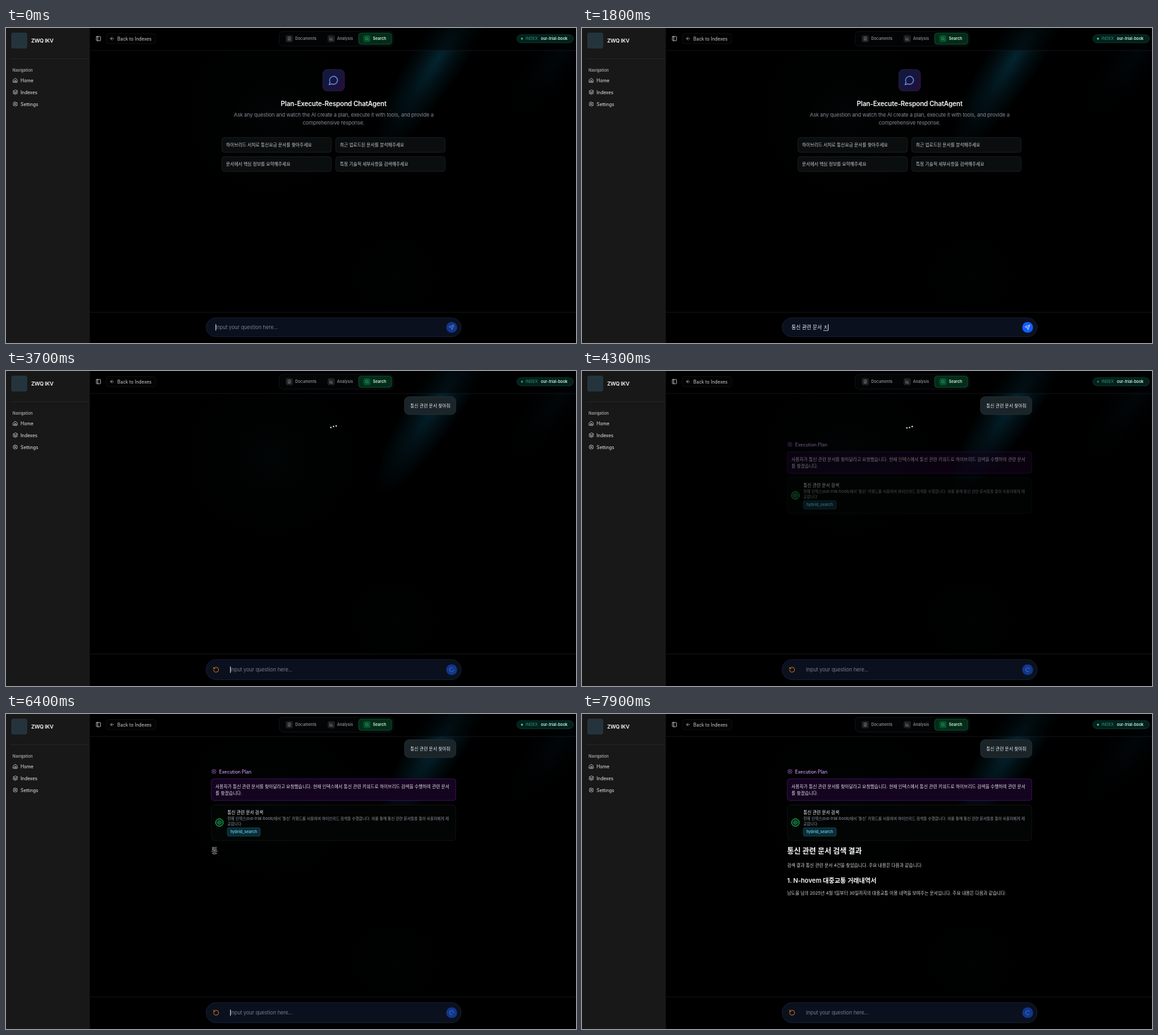
An HTML page for the animation above (8 s loop, 860x476 px).

```html
<!DOCTYPE html>
<html lang="ko">
<head>
<meta charset="utf-8">
<title>Document chat</title>
<style>
  html, body { margin: 0; width: 100%; height: 100%; overflow: hidden; background: #000; }
  svg { display: block; width: 860px; height: 476px; }
  text { font-family: Inter, "Noto Sans CJK KR", "Noto Sans CJK", sans-serif; white-space: pre; }
</style>
</head>
<body>
<svg id="stage" viewBox="0 0 860 476" xmlns="http://www.w3.org/2000/svg"></svg>
<script>
const LOOP = 8000, SEND = 2350, PLAN = 4200, ANSWER = 6200, STREAM = 6394;
const KEY_START = 100, KEY_STEP = 76;
const CHAR_STEP = 10.2, CHAR_FADE = 14;

const stage = document.getElementById('stage');
const $ = id => document.getElementById(id);
const clamp = v => Math.max(0, Math.min(1, v));

// Markup helpers
const text = (x, y, str, size, fill, weight = 400, extra = '') =>
  `<text x="${x}" y="${y}" font-size="${size}" fill="${fill}" font-weight="${weight}" ${extra}>${str}</text>`;
const box = (x, y, w, h, r, fill, stroke = 'none', extra = '') =>
  `<rect x="${x}" y="${y}" width="${w}" height="${h}" rx="${r}" fill="${fill}" stroke="${stroke}" stroke-width=".6" ${extra}/>`;
const line = (x1, y1, x2, y2, stroke) =>
  `<path d="M${x1} ${y1}L${x2} ${y2}" stroke="${stroke}" stroke-width=".6"/>`;
const icon = (cx, cy, size, d, stroke, id = '') =>
  `<g transform="translate(${cx - size / 2} ${cy - size / 2}) scale(${size / 24})"><path ${id && `id="${id}"`} d="${d}" fill="none" stroke="${stroke}" stroke-width="2" stroke-linecap="round" stroke-linejoin="round"/></g>`;
const circlePath = r => `M${12 - r} 12a${r} ${r} 0 1 0 ${2 * r} 0a${r} ${r} 0 1 0 ${-2 * r} 0`;

const ICONS = {
  home: 'M15 21v-8H9v8M3 10l9-7 9 7v11H3z',
  layers: 'M12 2 2 7l10 5 10-5zM2 12l10 5 10-5M2 17l10 5 10-5',
  gear: 'M12 2l3 3 4.500 0 .5 4.500 2 2.500-2 2.500-.5 4.500-4.500 0-3 3-3-3-4.500 0-.5-4.500-2-2.500 2-2.500 .5-4.500 4.500 0z' + circlePath(3),
  panel: 'M5 3h14a2 2 0 0 1 2 2v14a2 2 0 0 1-2 2H5a2 2 0 0 1-2-2V5a2 2 0 0 1 2-2zM9 3v18',
  back: 'M12 19l-7-7 7-7M19 12H5',
  file: 'M14 2H5v20h14V7zM14 2v5h5M9 13h6M9 17h6',
  chart: 'M3 3v18h18M8 17v-4M13 17V6M18 17v-7',
  search: 'M3 11a8 8 0 1 0 16 0a8 8 0 1 0-16 0M21 21l-4.300-4.300',
  chat: 'M7.9 20A9 9 0 1 0 4 16.100L2 22Z',
  send: 'M22 2 11 13M22 2l-7 20-4-9-9-4z',
  reset: 'M3 12a9 9 0 1 0 9-9 9.750 9.750 0 0 0-6.740 2.740L3 8M3 3v5h5',
  check: circlePath(10) + 'M8 12l3 3 5-6',
  spinner: 'M21 12a9 9 0 1 1-6.219-8.560'
};

const glow = (id, color, peak) =>
  `<radialGradient id="${id}"><stop stop-color="${color}" stop-opacity="${peak}"/><stop offset=".5" stop-color="${color}" stop-opacity="${peak * .4}"/><stop offset="1" stop-color="${color}" stop-opacity="0"/></radialGradient>`;

const backdrop = `
  <defs>
    ${glow('beam', '#063a4c', .62)}${glow('haze', '#041614', .22)}
    <linearGradient id="badge" x2="1" y2="1"><stop stop-color="#101a3c"/><stop offset="1" stop-color="#260d3a"/></linearGradient>
    <clipPath id="main"><rect x="126.500" width="734" height="476"/></clipPath>
  </defs>
  <rect width="860" height="476"/>
  <g clip-path="url(#main)">
    <ellipse cx="400" cy="130" rx="130" ry="120" fill="url(#haze)"/>
    <ellipse cx="585" cy="375" rx="70" ry="60" fill="url(#haze)" opacity=".6"/>
    <ellipse rx="165" ry="40" fill="url(#beam)" transform="translate(652 46) rotate(-57)"/>
    <ellipse rx="110" ry="36" fill="url(#beam)" opacity=".18" transform="translate(835 42) rotate(-50)"/>
    <rect x="126.500" width="734" height="34" fill="#000" opacity=".5"/>
  </g>`;

const navItem = (y, name, label) => icon(14, y, 8, ICONS[name], '#e5e5e5') + text(22, y + 2.5, label, 6.92, '#ececec');
const sidebar = `
  <rect width="126.500" height="476" fill="#181818"/>
  <rect x="8" y="7" width="24" height="24" rx="3" fill="#24343d"/>
  ${text(38, 21.6, 'ZWQ IKV', 7.9, '#fafafa', 600, 'letter-spacing="-.15"')}
  ${line(6, 46.5, 125, 46.5, '#2d2d2d')}
  ${text(10, 65.5, 'Navigation', 5.95, '#b5b5b5', 500)}
  ${navItem(79, 'home', 'Home')}${navItem(97, 'layers', 'Indexes')}${navItem(115, 'gear', 'Settings')}`;

const tab = (x, name, label, bg, fg, ink, weight) =>
  box(x, 10.7, 10.8, 10.8, 2.5, bg) + icon(x + 5.4, 16.1, 6, ICONS[name], fg) + text(x + 14.2, 18.2, label, 5.95, ink, weight);
const header = `
  ${line(126.5, 34, 860, 34, '#1b2125')}
  ${icon(139.5, 16, 8.5, ICONS.panel, '#e5e5e5')}
  ${box(151, 8.5, 75, 15.3, 4, '#030303', '#1a1a1a')}
  ${icon(160, 16, 8, ICONS.back, '#d4d4d4')}
  ${text(168, 18.5, 'Back to Indexes', 6.92, '#d0d0d0')}
  ${box(412, 5, 172.5, 22.3, 6, '#030405', '#1b1e20')}
  ${tab(422, 'file', 'Documents', '#1d1f20', '#999', '#96999d', 500)}
  ${tab(485.3, 'chart', 'Analysis', '#1d1f20', '#999', '#96999d', 500)}
  ${box(532, 7.7, 50, 17, 4, '#042c18', '#12693f')}
  ${tab(539.2, 'search', 'Search', '#07502b', '#34d399', '#d8f6e6', 600)}
  ${box(770.8, 10, 85.2, 12.3, 6.1, '#04201b', '#0c4c3d')}
  <circle id="live" cx="778.500" cy="16.100" r="1.600" fill="#34d399"/>
  ${text(784, 18.3, 'INDEX', 5.95, '#2c9f80', 400, 'letter-spacing=".1"')}
  ${text(807, 18.3, 'our-trial-book', 5.95, '#c9f7e5', 600)}`;

const suggestion = (x, y, label) =>
  box(x, y, 165.3, 22.6, 4, '#0a0e0f', '#23292b') + text(x + 6.3, y + 13.7, label, 6.63, '#cbced2');
const tracked = 'text-anchor="middle" letter-spacing="-.14"';
const hero = `<g id="hero">
  ${box(478, 62.8, 32.5, 32.3, 6.5, 'url(#badge)', '#2b3164')}
  ${icon(494.2, 79, 16, ICONS.chat, '#4b9af5')}
  ${text(494.3, 117.6, 'Plan-Execute-Respond ChatAgent', 9.88, '#fafafa', 600, tracked)}
  ${text(494.3, 133.8, 'Ask any question and watch the AI create a plan, execute it with tools, and provide a', 7.9, '#858a93', 400, tracked)}
  ${text(494.3, 145.8, 'comprehensive response.', 7.9, '#858a93', 400, tracked)}
  ${suggestion(325.7, 165.4, '하이브리드 서치로 통신요금 문서를 찾아주세요')}
  ${suggestion(497.4, 165.4, '최근 업로드된 문서를 분석해주세요')}
  ${suggestion(325.7, 194.3, '문서에서 핵심 정보를 요약해주세요')}
  ${suggestion(497.4, 194.3, '특정 기술적 세부사항을 검색해주세요')}
</g>`;

const plan = `<g id="plan">
  ${icon(313.7, 111, 8, ICONS.gear, '#b26bf0')}
  ${text(321.5, 113.5, 'Execution Plan', 6.92, '#cf9bf8', 500)}
  ${box(309.8, 122, 368.8, 32.7, 4, '#14041f', '#561a7c')}
  ${text(316, 135.9, '사용자가 통신 관련 문서를 찾아달라고 요청했습니다. 현재 인덱스에서 통신 관련 키워드로 하이브리드 검색을 수행하여 관련 문서', 6.63, '#e5deea')}
  ${text(316, 145.8, '를 찾겠습니다.', 6.63, '#e5deea')}
  ${box(309.8, 161.3, 368.8, 53.8, 5, '#030505', '#1a1d1e')}
  <circle cx="322" cy="188" r="5.800" fill="#06301a" stroke="#22c55e" stroke-width=".9"/>
  ${icon(322, 188, 6, ICONS.check, '#3ddc78')}
  ${text(334, 175, '통신 관련 문서 검색', 6.63, '#f5f5f5', 500)}
  ${text(334, 183.9, "현재 인덱스(our-trial-book)에서 '통신' 키워드를 사용하여 하이브리드 검색을 수행합니다. 이를 통해 통신 관련 문서들을 찾아 사용자에게 제", 5.72, '#979ca3')}
  ${text(334, 191.9, '공합니다.', 5.72, '#979ca3')}
  ${box(334, 196, 49.5, 12.6, 2, '#0a2c37', '#17596a')}
  ${text(338.6, 204.4, 'hybrid_search', 5.95, '#6bd8ea', 500)}
</g>`;

const ANSWER_LINES = [
  [211.4, 11.1, 700, '#fafafa', '통신 관련 문서 검색 결과'],
  [231.3, 6.63, 400, '#d6d8db', '검색 결과 통신 관련 문서 4건을 찾았습니다. 주요 내용은 다음과 같습니다:'],
  [255.4, 9.45, 600, '#fafafa', '1. N-hovem 대중교통 거래내역서'],
  [273.1, 6.63, 400, '#d6d8db', '남도율 님의 2025년 4월 1일부터 30일까지의 대중교통 이용 내역을 보여주는 문서입니다. 주요 내용은 다음과 같습니다:']
];
const answer = ANSWER_LINES.map(([y, size, weight, fill, str]) =>
  text(309.5, y, [...str].map(c => `<tspan class="ch">${c}</tspan>`).join(''), size, fill, weight)).join('');

const chat = `<g id="chat">
  ${box(601.2, 38.8, 77.5, 27, 7, '#1a2429', '#303b40')}
  ${text(610, 54.6, '통신 관련 문서 찾아줘', 6.63, '#e8eaec')}
  <g id="dots" fill="#f5f5f5">${[490.2, 494.2, 498.2].map(x => `<circle cx="${x}" cy="86" r="1.100"/>`).join('')}</g>
  ${plan}
  <g id="answer">${answer}</g>
</g>`;

const composer = `
  <g id="rule">${line(126.5, 0, 860, 0, '#1c1f22')}</g>
  <rect id="pill" x="301.800" width="385" rx="15" fill="#0a101e" stroke="#1d283c" stroke-width=".7"/>
  <g id="row">
    <g id="reset">${icon(317, 0, 10, ICONS.reset, '#f08316')}</g>
    ${text(316, 2.8, 'Input your question here...', 7.9, '#747b87', 400, 'id="hint" letter-spacing="-.14"')}
    ${text(316, 2.6, '', 7.55, '#eef0f3', 400, 'id="typed"')}
    <rect id="under" y="4.300" height=".8" fill="#eef0f3"/>
    <rect id="caret" y="-4.800" width=".8" height="9.600" fill="#fff"/>
    <circle id="button" cx="672.400" r="8.200"/>
    <g id="plane">${icon(672.1, .2, 8, ICONS.send, '#fff', 'planePath')}</g>
    <g id="spin">${icon(0, 0, 8, ICONS.spinner, '#5288dc')}</g>
  </g>`;

stage.innerHTML = backdrop + header + hero + chat + composer + sidebar;

// Successive states of each syllable while it is being composed
const SYLLABLES = ['ㅌ토통', 'ㅅ시신', ' ', 'ㄱ고과관', 'ㄹ려련', ' ', 'ㅁ무문', 'ㅅ서', ' ', 'ㅊ차찾', 'ㅇ아', 'ㅈ주줘'];
const KEYSTROKES = [''];
SYLLABLES.reduce((done, states) => {
  for (const s of states) KEYSTROKES.push(done + s);
  return done + states.at(-1);
}, '');

const chars = [...document.querySelectorAll('.ch')];
const dots = [...$('dots').children];
const show = (id, on) => { $(id).style.display = on ? '' : 'none'; };
const set = (id, attrs) => { for (const k in attrs) $(id).setAttribute(k, attrs[k]); };

// Each dot hops for 0.6 s, 0.1 s after its neighbour, then all rest
function hop(seconds) {
  const u = seconds / .3;
  if (u <= 0 || u >= 2) return 0;
  return 1 - Math.abs(1 - u) ** 2.2;
}

function updateComposer(t) {
  const sent = t >= SEND;
  const strokes = Math.max(0, Math.min(KEYSTROKES.length - 1, Math.floor((t - KEY_START) / KEY_STEP)));
  const typed = sent ? '' : KEYSTROKES[strokes];
  const field = $('typed'), left = sent ? 338 : 316;
  let caretX = left + .3;

  field.textContent = typed;
  const composing = typed && !typed.endsWith(' ');
  show('under', composing);
  if (typed) {
    caretX = left + field.getComputedTextLength();
    if (composing) {
      const x = field.getStartPositionOfChar(typed.length - 1).x;
      set('under', { x, width: caretX - x });
    }
  }
  set('caret', { x: caretX });
  show('caret', !sent || (t - SEND) % 1000 < 500);
  set('hint', { x: left });
  show('hint', !typed);

  set('rule', { transform: `translate(0 ${sent ? 427.6 : 429.6})` });
  set('pill', { y: sent ? 436 : 438, height: sent ? 30.6 : 28.6 });
  set('row', { transform: `translate(0 ${sent ? 451.4 : 452.4})` });
  show('reset', sent);
  show('plane', !sent);
  show('spin', sent);
  set('button', { fill: typed ? '#155dfc' : '#12368a' });
  set('planePath', { stroke: typed ? '#fff' : '#7f93bd' });
  set('spin', { transform: `translate(672.4 0) rotate(${(t - 3700) * .694})` });
}

function updateChat(t) {
  show('hero', t < SEND);
  show('chat', t >= SEND);
  show('dots', t < ANSWER);
  const origin = t < PLAN ? 2400 : PLAN + 400;
  const cycle = ((t - origin + 8430) % 843) / 1000 * 1.245;
  dots.forEach((dot, i) => dot.setAttribute('cy', 86 - 3 * hop(cycle - i * .1)));

  set('plan', {
    opacity: clamp((t - PLAN) / 200),
    transform: `translate(0 ${t < ANSWER ? 0 : -24})`
  });
  chars.forEach((c, i) => c.setAttribute('fill-opacity', clamp((t - STREAM - i * CHAR_STEP) / CHAR_FADE)));
}

function update(t) {
  updateComposer(t);
  updateChat(t);
  set('live', { opacity: .7 + .3 * Math.cos((t - 1800) / 1530 * 2 * Math.PI) });
}

const start = performance.now();
function frame() {
  update((performance.now() - start) % LOOP);
  requestAnimationFrame(frame);
}
update(0);
requestAnimationFrame(frame);
</script>
</body>
</html>
```
